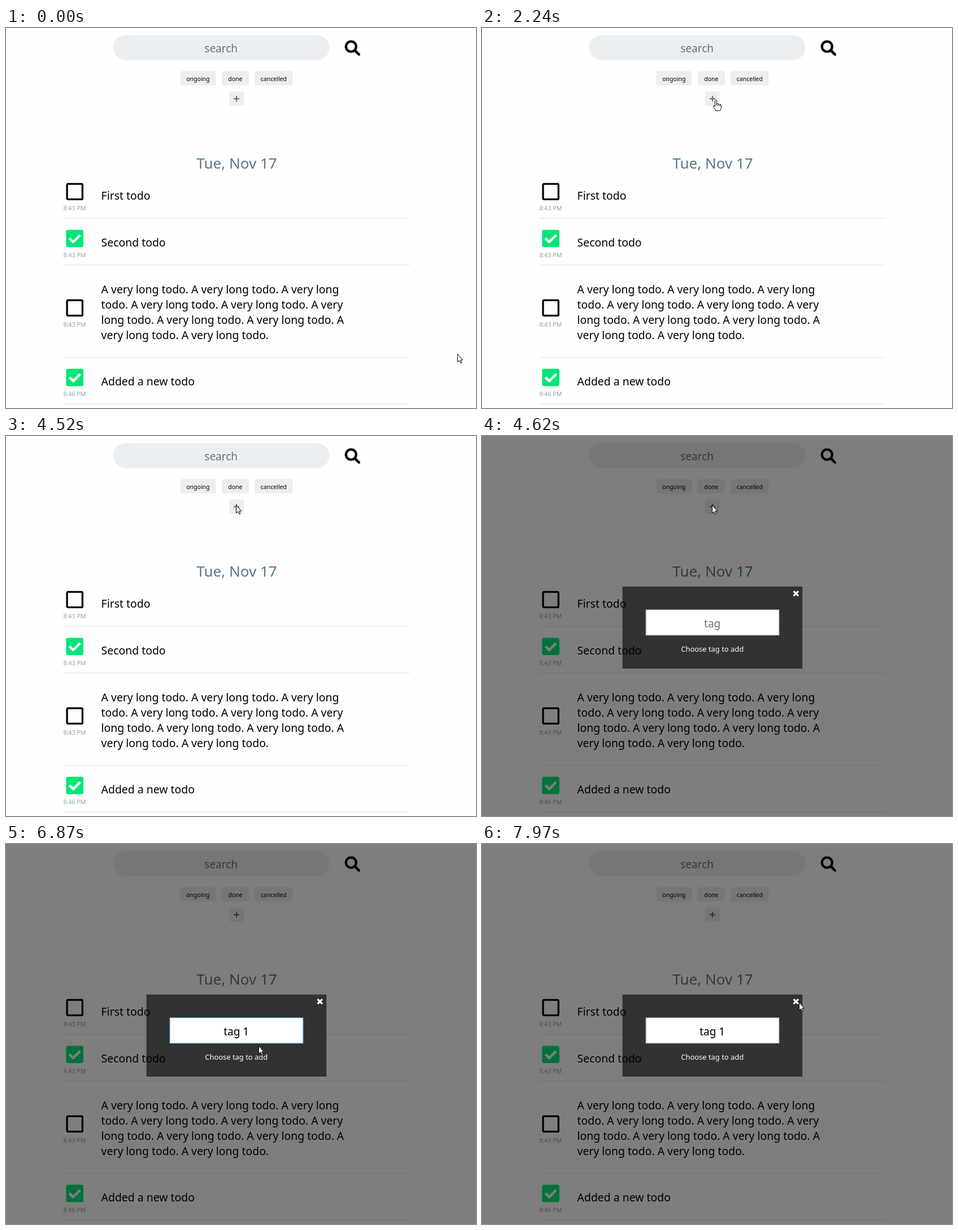
Animation, 832 px wide and 673 px high, one loop 8 s. Source, as an HTML page:

```html
<!DOCTYPE html>
<html lang="en">
<head>
<meta charset="utf-8">
<title>Todo list</title>
<style>
  html, body { margin: 0; width: 100%; height: 100%; overflow: hidden; background: #fefefe; }
  svg { display: block; width: 832px; height: 673px; }
  text { font-family: "Noto Sans", "Open Sans", sans-serif; white-space: pre; }
  .mid { text-anchor: middle; }
  .todo { font-size: 19.4px; }
  .time { font-size: 10.65px; fill: #90a4ae; }
  .tag { font-size: 10.5px; }
  .field { font-size: 19px; fill: #6f6f6f; }
  .date { font-size: 26px; fill: #557888; }
  .box { fill: none; stroke: #000; stroke-width: 3.3; }
  .done rect { fill: #00e676; }
  .done path { fill: none; stroke: #fefefe; stroke-width: 4.4; }
  #dialog { visibility: hidden; }
  .dimmed #dialog { visibility: visible; }
  #input { fill: #fff; stroke: #8a8a8a; }
  #input.focus { stroke: #3c9ad6; }
  #value.typed { fill: #000; }
  #arrow, #hand { fill: #fff; stroke: #000; stroke-width: 1; stroke-linejoin: round; }
</style>
</head>
<body>
<svg id="stage" viewBox="0 0 832 673">
  <rect width="832" height="673" fill="#fefefe"/>
  <rect x="189.5" y="12.5" width="383" height="44.5" rx="22.2" fill="#ebeff2"/>
  <text class="field mid" x="380.7" y="42.7">search</text>
  <g transform="translate(599.7 21.8) scale(.0535)" fill="none" stroke="#000">
    <circle cx="208" cy="208" r="168" stroke-width="80"/>
    <path d="M325 325L470 470" stroke-width="86"/>
    <path d="M455 455L474 474" stroke-width="76" stroke-linecap="round"/>
  </g>
  <g id="tags"></g>
  <path d="M403 125.2h10M408 120.2v10" stroke="#666" stroke-width="2"/>
  <text class="date mid" x="408.5" y="248.8">Tue, Nov 17</text>
  <g id="todos"></g>
  <g id="dialog">
    <rect width="832" height="673" fill="#000" opacity=".5"/>
    <rect x="248.6" y="266.6" width="318.6" height="145.4" fill="#000" opacity=".6"/>
    <path d="M551.6 274.9l8.3 8.3m0-8.3l-8.3 8.3" stroke="#fff" stroke-width="3.2"/>
    <rect id="input" x="290" y="307.7" width="236" height="45.3"/>
    <text id="value" class="field mid" x="407.7" y="338.7"></text>
    <rect id="caret" y="319" width="1" height="24"/>
    <text class="mid" x="407.7" y="382" font-size="12.95" fill="#fff">Choose tag to add</text>
  </g>
  <g id="cursor">
    <path id="arrow" d="M.5 .5V14.6L3.6 11.8 5.8 16.5 7.8 15.7 5.7 11H9.5Z"/>
    <path id="hand" d="M-1.5 1.2Q-1.5 -.3 0 -.3T1.5 1.2V6Q3.8 5.2 4.3 6.8 6.2 6 6.9 7.6 9.4 7 9.4 9.4V13Q9.4 15 8 16.6V18.5H-.5V17.2L-4.2 12.2Q-5 10.6 -4 9.8 -2.8 9.3 -1.5 11ZM1.5 6V9.5M4.3 7V10M6.9 8V10.5"/>
    <path id="ibeam" d="M-3 -6.5H-1Q0 -6.5 0 -5.5 0 -6.5 1 -6.5H3M0 -6V6M-3 6.5H-1Q0 6.5 0 5.5 0 6.5 1 6.5H3" fill="none" stroke="#000"/>
  </g>
</svg>
<script>
const $ = id => document.getElementById(id);
const LOOP = 8000;

const tagBox = (x, y, w, label = '') =>
  `<rect x="${x}" y="${y}" width="${w}" height="25.3" rx="3" fill="#edeeee"/>
   <text class="tag mid" x="${x + w / 2}" y="${y + 17.6}">${label}</text>`;

$('tags').innerHTML = tagBox(308.6, 76.2, 62.6, 'ongoing') + tagBox(382, 76.2, 47.8, 'done') +
  tagBox(440.2, 76.2, 67.4, 'cancelled') + tagBox(395, 112.4, 26);

// Each row: centre of its checkbox, y of its divider, time, done, lines of text
const rows = [
  [289.7, 337, '8:43 PM', false, ['First todo']],
  [372.7, 419.8, '8:43 PM', true, ['Second todo']],
  [495.8, 583.4, '8:43 PM', false, [
    'A very long todo. A very long todo. A very long',
    'todo. A very long todo. A very long todo. A very',
    'long todo. A very long todo. A very long todo. A',
    'very long todo. A very long todo.']],
  [618.9, 666.2, '8:46 PM', true, ['Added a new todo']]
];

const openBox = '<rect class="box" x="1.65" y="1.65" width="27.3" height="27.3" rx="1.7"/>';
const doneBox = `<g class="done"><rect width="30.6" height="30.6" rx="3.3"/>
  <path d="M5.8 15L12.6 21.6 24.9 9.3"/></g>`;

$('todos').innerHTML = rows.map(([cy, divider, time, done, lines]) => {
  const firstLine = cy + 14.3 - (lines.length - 1) * 13.5;
  const text = lines.map((line, i) =>
    `<text class="todo" x="168.6" y="${firstLine + i * 27}">${line}</text>`);
  return `<text class="time mid" x="121.4" y="${cy + 33.2}">${time}</text>
    <rect x="101.5" y="${divider - .8}" width="613" height="1.6" fill="#ebecec"/>
    <g transform="translate(106.4 ${cy - 15.3})">${done ? doneBox : openBox}</g>` + text.join('');
}).join('');

// Pointer moves: first step, last step, number of steps, x, y
const moves = [
  [70, 120, 2, 757, 285],
  [280, 990, 10, 480, 157],
  [1470, 2090, 9, 407, 117],
  [2240, 2240, 1, 414, 128],
  [3950, 4120, 3, 403, 128],
  [4290, 4520, 4, 407, 122],
  [5070, 5530, 7, 419, 338],
  [5680, 5680, 1, 425, 342],
  [6650, 6870, 4, 447, 357],
  [7100, 7360, 4, 588, 265],
  [7510, 7970, 7, 561, 280]
];
const shapes = [[0, 'arrow'], [2010, 'hand'], [4520, 'arrow'], [5370, 'ibeam'], [6720, 'arrow']];
const values = [[0, ''], [6010, 't'], [6150, 'ta'], [6240, 'tag'], [6410, 'tag '], [6560, 'tag 1']];
const carets = [[0, false], [5530, true], [6720, false], [7100, true], [7510, false]];
const dims = [[0, false], [4620, true]];
const focuses = [[0, false], [5530, true], [7890, false]];

const at = (steps, t) => steps.findLast(([start]) => t >= start)[1];
const ease = p => p * (1.6 - .6 * p);

function pointer(t) {
  let x = 799, y = 577;
  for (const [from, to, count, nx, ny] of moves) {
    if (t < from) break;
    const gap = (to - from) / (count - 1) || 1;
    const done = Math.min(count, Math.floor((t - from + 2) / gap) + 1);
    const p = ease(done / count);
    x += (nx - x) * p;
    y += (ny - y) * p;
  }
  return [Math.round(x), Math.round(y)];
}

function draw(t) {
  $('stage').classList.toggle('dimmed', at(dims, t));
  $('input').classList.toggle('focus', at(focuses, t));

  const value = at(values, t), text = $('value');
  text.textContent = value || 'tag';
  text.classList.toggle('typed', value !== '');
  const half = value ? text.getComputedTextLength() / 2 : 0;
  $('caret').setAttribute('x', Math.round(407.7 + half));
  $('caret').style.display = at(carets, t) ? '' : 'none';

  const shape = at(shapes, t);
  for (const id of ['arrow', 'hand', 'ibeam']) $(id).style.display = id === shape ? '' : 'none';
  $('cursor').setAttribute('transform', `translate(${pointer(t)})`);
}

const start = performance.now();
function tick() {
  draw((performance.now() - start) % LOOP);
  requestAnimationFrame(tick);
}
tick();
</script>
</body>
</html>
```
